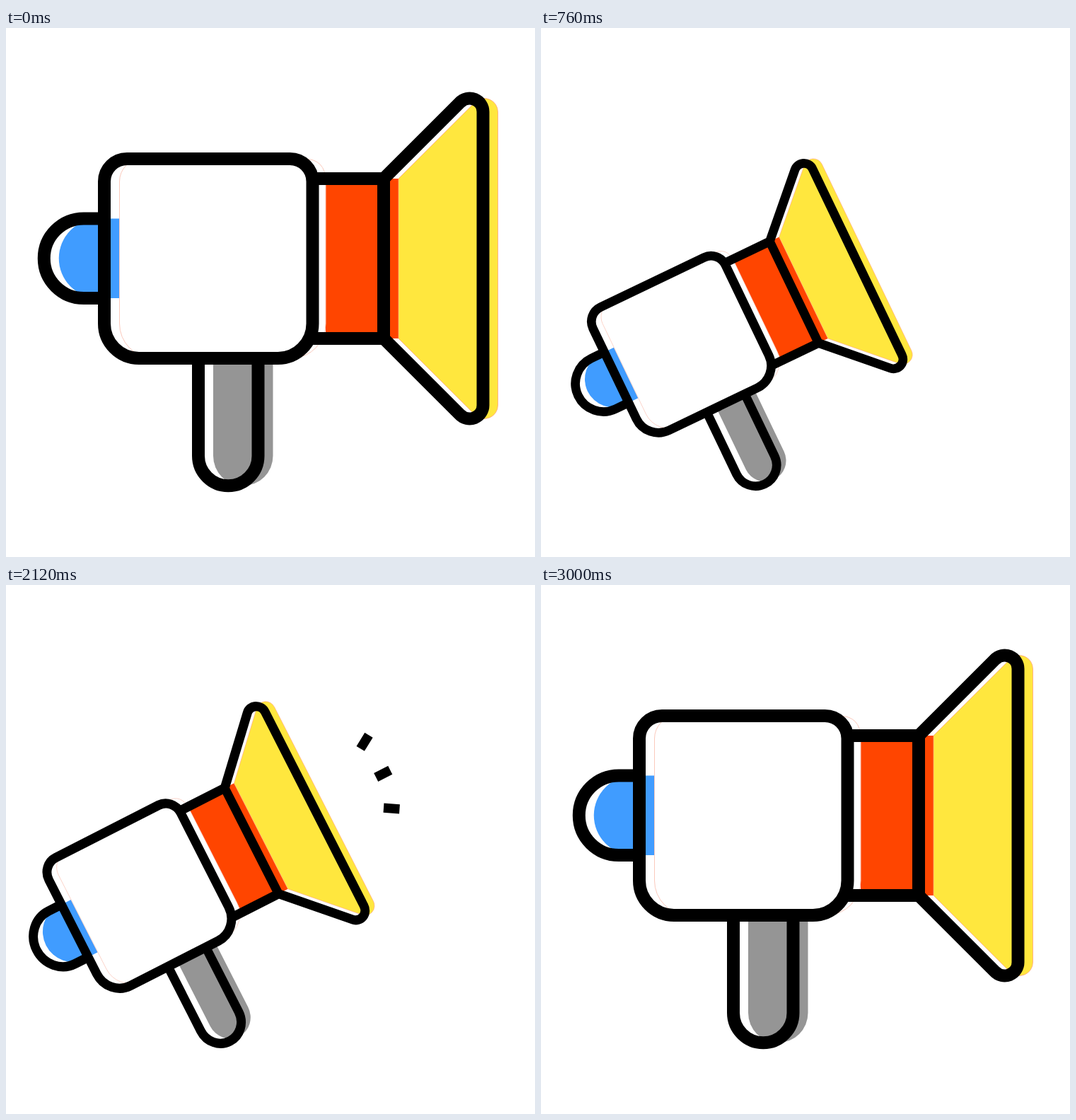
Write an HTML page that moves like this. It is 748 px wide and 748 px high and loops after 3.34 s.

```html
<!DOCTYPE html>
<html lang="en">
<head>
<meta charset="utf-8">
<title>Megaphone</title>
<style>
html, body { margin: 0; width: 100%; height: 100%; overflow: hidden; background: #fff; }
svg { display: block; width: 100vw; height: 100vh; }
</style>
</head>
<body>
<svg viewBox="0 0 748 748">
  <g id="horn">
    <g transform="translate(21)">
      <path fill="#409cff" d="M139.3 269.5H110A56 56 0 0 0 110 382H139.3Z"/>
      <path fill="#959595" d="M272 460V605A42 42 0 0 0 356.5 605V460Z"/>
      <path fill="#ff4500" d="M431 213H534V439H431Z"/>
      <path fill="#ffe73e" stroke="#ffa37a" stroke-width=".8" d="M534 213L641.6 105.6A19 19 0 0 1 674.5 119V533A19 19 0 0 1 641.6 546.4L534 439Z"/>
      <path fill="#fff" stroke="#fbc9bc" d="M171 185H400Q431 185 431 217V418A49 49 0 0 1 384 467H188A49 49 0 0 1 139.5 418V217A32 32 0 0 1 171 185Z"/>
    </g>
    <g fill="none" stroke="#000" stroke-width="18">
      <path d="M171 185H401.5A32 32 0 0 1 433.5 217V418A49 49 0 0 1 384.5 467H188A49 49 0 0 1 139 418V217A32 32 0 0 1 171 185Z"/>
      <path d="M139 269.5H110A56 56 0 0 0 110 382H139"/>
      <path d="M272 467V605A42 42 0 0 0 356.5 605V467"/>
      <path d="M433 213H534L641.6 105.6A19 19 0 0 1 674.5 119V533A19 19 0 0 1 641.6 546.4L534 439H433M534 213V439"/>
    </g>
  </g>
  <path id="rays" fill="none" stroke="#000" stroke-width="13.3"/>
</svg>
<script>
const LOOP = 3340, STEP = 20, SMALL = 0.742, TILT = -27, REACH = 141;
// Inner end and direction (degrees) of each sound ray
const RAYS = [[501.2, 231.4, -58.5], [523.2, 272, -27], [534, 315.2, 4]];
const horn = document.getElementById('horn');
const rays = document.getElementById('rays');

const span = (t, start, length) => Math.min(1, Math.max(0, (t - start) / length));
const inOut = p => (1 - Math.cos(Math.PI * p)) / 2;
const out = (p, power) => 1 - (1 - p) ** power;

function pose(t) {
  if (t < 240) return [1 - inOut(span(t, 0, 240)), 0];
  if (t < 2800) {
    const p = out(span(t, 241, 1319), 6);
    return [SMALL * p, TILT * p];
  }
  const p = inOut(span(t, 2800, 200));
  return [SMALL + (1 - SMALL) * p ** 0.75, TILT * (1 - p)];
}

function squash(t) {
  if (t <= 1560 || t >= 2560) return 1;
  return 1 - 0.117 * Math.sin(Math.PI * ((t - 1560) % 500) / 500);
}

function rayPath(t) {
  const start = t < 2100 ? 1560 : 2100;
  const head = REACH * out(span(t, start, 240), 2);
  const tail = REACH * out(span(t, start + 220, 240), 2);
  if (head - tail < 0.1) return '';
  return RAYS.map(([x, y, deg]) => {
    const a = deg * Math.PI / 180;
    const at = r => `${x + r * Math.cos(a)} ${y + r * Math.sin(a)}`;
    return `M${at(tail)}L${at(head)}`;
  }).join('');
}

function draw(now) {
  const t = Math.floor((now % LOOP) / STEP) * STEP;
  const [scale, angle] = pose(t);
  horn.setAttribute('transform',
    `translate(314.3 640.7) rotate(${angle}) scale(${scale * squash(t)} ${scale}) translate(-314.3 -640.7)`);
  rays.setAttribute('d', rayPath(t));
}

let origin;
function tick(now) {
  origin ??= now;
  draw(now - origin);
  requestAnimationFrame(tick);
}
draw(0);
requestAnimationFrame(tick);
</script>
</body>
</html>
```
